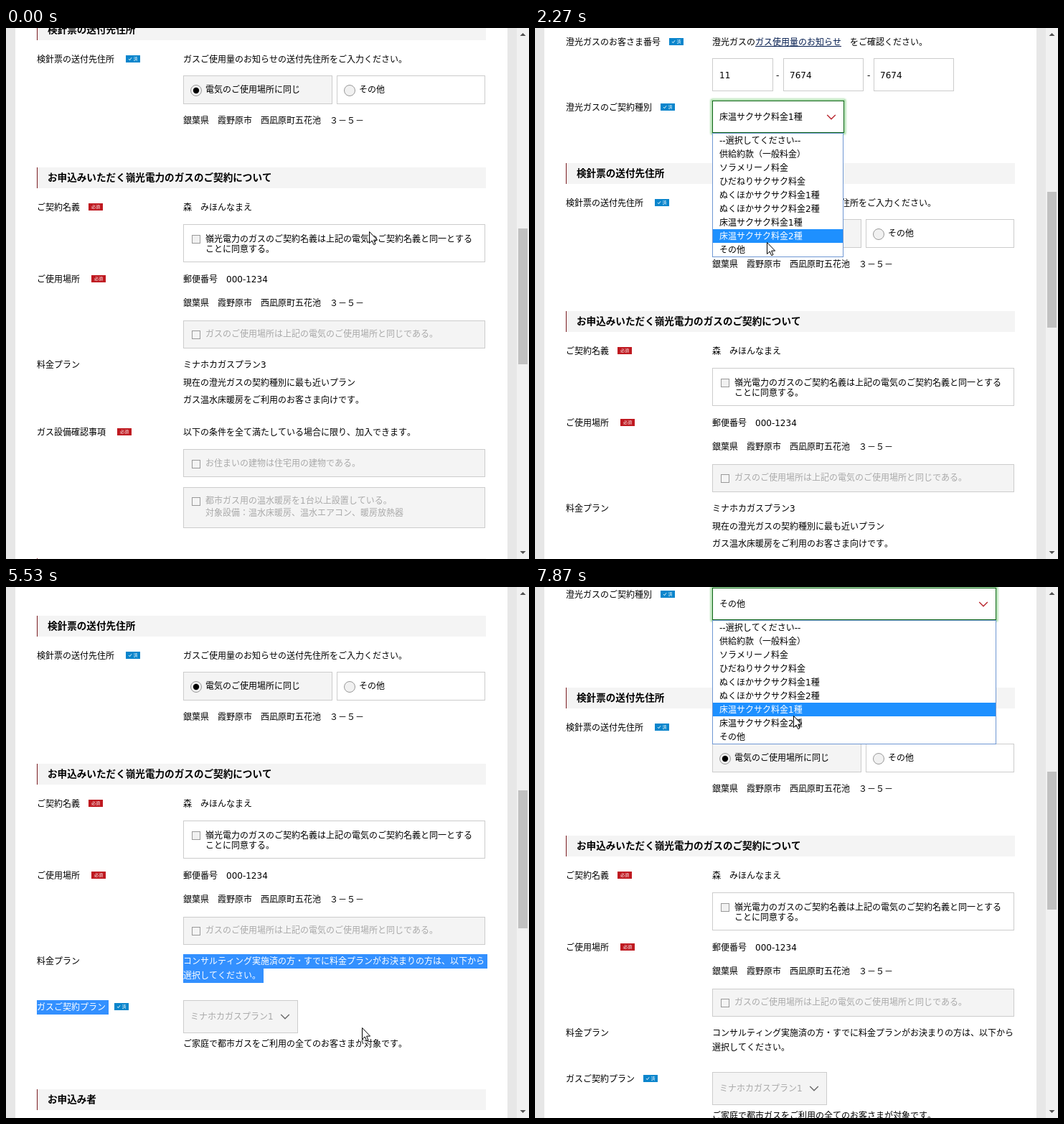
These frames come from a looping animation (729x739 px, 8 s). An HTML page:

```html
<!DOCTYPE html>
<html lang="ja">
<head>
<meta charset="utf-8">
<title>お申込みフォーム</title>
<style>
  html, body { margin: 0; width: 100%; height: 100%; overflow: hidden; background: #fff; }
  svg { display: block; }
  text {
    font: 12px "DejaVu Sans", "Noto Sans CJK JP", "Noto Sans CJK", sans-serif;
    font-kerning: none; text-spacing-trim: space-all; white-space: pre;
  }
  text.head { font-size: 13.6px; font-weight: bold; }
  text.tag { font-size: 6px; fill: #fff; }
  text.link { fill: #001a4d; }
  #glow { filter: blur(.8px); }
</style>
</head>
<body>
<svg id="stage" width="729" height="739" viewBox="0 0 729 739"></svg>
<script>
const LOOP = 8000;
const GREY = '#f4f4f4', LINE = '#ccc', FAINT = '#a9a9a9', HOT = '#1e90ff', ACCENT = '#7a1c20';
const POWER = '嶺光電力', GAS = '澄光ガス', PLAN = 'ミナホカガスプラン';
const ADDRESS = '銀葉県　霞野原市　西凪原町五花池　３－５－';
const OPTIONS = ['--選択してください--', '供給約款（一般料金）', 'ソラメリーノ料金', 'ひだねりサクサク料金',
  'ぬくほかサクサク料金1種', 'ぬくほかサクサク料金2種', '床温サクサク料金1種', '床温サクサク料金2種', 'その他'];
const ROW = 19, LIST_TOP = 147, LOWER_SHIFT = 52;

// --- drawing helpers: y of a text is the middle of its line ---
const text = (x, y, s, attrs = '') => `<text x="${x}" y="${y + 5}" ${attrs}>${s}</text>`;
const rect = (x, y, w, h, fill, attrs = '') =>
  `<rect x="${x}" y="${y}" width="${w}" height="${h}" fill="${fill}" ${attrs}/>`;
const box = (x, y, right, bottom, fill = '#fff', stroke = LINE, id = '') =>
  rect(x + .5, y + .5, right - x - 1, bottom - y - 1, fill, `stroke="${stroke}" id="${id}"`);
const link = (x, y, s) => text(x, y, s, 'class="link"') + rect(x, y + 6, s.length * 12, 1, '#001a4d');
const faint = (x, y, s) => text(x, y, s, `fill="${FAINT}"`);
const heading = (y, s) => rect(43, y, 626, 29, GREY) + rect(43, y, 1, 29, ACCENT) + text(58, y + 14, s, 'class="head"');
const required = (x, y) => rect(x, y - 5, 20, 10, '#bf1920') + text(x + 4, y - 3, '必須', 'class="tag"');
const done = (x, y) => rect(x, y - 5, 20, 10, '#0a85cc') +
  `<path d="M${x + 4} ${y}l1.5 1.7 2.5-3.4" fill="none" stroke="#fff" stroke-width=".9"/>` +
  text(x + 10.5, y - 3, '済', 'class="tag"');
const check = (y, fill) => box(259, y, 271, y + 12, fill, '#999');
const chevron = (x, y, color, id = '') =>
  `<path id="${id}" d="M-5.8 -3L0 2.8L5.8 -3" transform="translate(${x} ${y})" fill="none" stroke="${color}" stroke-width="1.3"/>`;
const radio = (x, y, on) => `<circle cx="${x}" cy="${y}" r="7.5" fill="#f1f1f1" stroke="#999"/>` +
  (on ? `<circle cx="${x}" cy="${y}" r="4.2"/>` : '');

const customer = [
  text(43, 19, `${GAS}のお客さま番号`), done(187, 19),
  text(247, 19, `${GAS}の`), link(307, 19, 'ガス使用量のお知らせ'), text(439, 19, 'をご確認ください。'),
  box(247, 42, 332, 88), box(346, 42, 458, 88), box(472, 42, 584, 88),
  text(257, 65, '11'), text(336, 65, '-'), text(355, 65, '7674'), text(463, 65, '-'), text(481, 65, '7674'),
  text(43, 110, `${GAS}のご契約種別`), done(175, 110)
];

const select = [
  rect(246, 100, 0, 47, 'none', 'id="glow" stroke="#a5dca5" stroke-width="3" rx="1"'),
  box(247, 101, 431, 146, '#fff', LINE, 'select'),
  text(257, 123, '', 'id="value"'), chevron(413, 124, '#b8232b', 'arrow')
];

const advice = [
  text(247, 155, '「その他」の方は、まずはコンサルティングの実施をお願いいたします。'),
  link(247, 175, 'コンサルティングの申し込みはこちら')
];

const common = [
  heading(188, '検針票の送付先住所'),
  text(43, 243, '検針票の送付先住所'), done(167, 243),
  text(247, 243, 'ガスご使用量のお知らせの送付先住所をご入力ください。'),
  box(247, 266, 455, 306, GREY), radio(265, 287, true), text(278, 285, '電気のご使用場所に同じ'),
  box(461, 266, 668, 306), radio(479, 287, false), text(492, 285, 'その他'),
  text(247, 328, ADDRESS),
  heading(394, `お申込みいただく${POWER}のガスのご契約について`),
  text(43, 449, 'ご契約名義'), required(115, 449), text(247, 449, '森　みほんなまえ'),
  box(247, 473, 668, 526), check(488, '#f1f1f1'),
  text(278, 493, `${POWER}のガスのご契約名義は上記の電気のご契約名義と同一とする`),
  text(278, 507, 'ことに同意する。'),
  text(43, 549, 'ご使用場所'), required(119, 549), text(247, 549, '郵便番号　000-1234'),
  text(247, 582, ADDRESS),
  box(247, 607, 668, 646, GREY), check(621, GREY), faint(278, 625, 'ガスのご使用場所は上記の電気のご使用場所と同じである。'),
  text(43, 668, '料金プラン')
];

const floorHeating = [
  text(247, 668, `${PLAN}3`),
  text(247, 693, `現在の${GAS}の契約種別に最も近いプラン`),
  text(247, 717, 'ガス温水床暖房をご利用のお客さま向けです。'),
  text(43, 762, 'ガス設備確認事項'), required(155, 762),
  text(247, 762, '以下の条件を全て満たしている場合に限り、加入できます。'),
  box(247, 786, 668, 825, GREY), check(801, GREY), faint(278, 805, 'お住まいの建物は住宅用の建物である。'),
  box(247, 839, 668, 896, GREY), check(853, GREY),
  faint(278, 857, '都市ガス用の温水暖房を1台以上設置している。'),
  faint(278, 874, '対象設備：温水床暖房、温水エアコン、暖房放熱器'),
  heading(938, '')
];

// Selectable lines of the other layout: x, middle, string.
const LINES = [
  [247, 668, 'コンサルティング実施済の方・すでに料金プランがお決まりの方は、以下から'],
  [247, 688, '選択してください。'],
  [43, 732, 'ガスご契約プラン'],
  [247, 783, 'ご家庭で都市ガスをご利用の全てのお客さまが対象です。']
];
const otherPlan = [
  ...LINES.map(l => text(...l)), done(151, 732),
  box(247, 723, 407, 769, GREY), faint(257, 745, `${PLAN}1`), chevron(389, 746, '#666'),
  heading(847, 'お申込み者'),
  '<clipPath id="marked">', ...LINES.map(() => '<rect class="mark" height="20"/>'), '</clipPath>',
  '<g clip-path="url(#marked)">', rect(0, 650, 700, 150, '#3390ff'),
  ...LINES.map(l => text(...l, 'fill="#fff"')), '</g>'
];

const list = [
  box(247, 146, 430, 319, '#fff', '#6f97d3', 'frame'),
  rect(248, 0, 0, ROW, HOT, 'id="hot"'),
  ...OPTIONS.map((s, i) => text(257, LIST_TOP + ROW * i + 9, s, 'class="option"'))
];

const group = (id, parts) => `<g id="${id}">${parts.join('')}</g>`;
document.getElementById('stage').innerHTML = [
  rect(0, 0, 729, 739, '#e7e7e7'), rect(13, 0, 686, 739, '#fff'),
  group('page', [
    ...customer, ...select, group('advice', advice),
    group('lower', [...common, group('planA', floorHeating), group('planB', otherPlan)]),
    group('list', list)
  ]),
  rect(712, 0, 17, 739, '#f1f1f1'), rect(714, 0, 13, 189, '#c1c1c1', 'id="thumb"'),
  '<path d="M716.5 11l4-4 4 4zM716.5 728l4 4 4-4z" fill="#505050"/>',
  '<path id="cursor" d="M.5 .5v16l3.7-3.5 2.5 5.6 2.3-1-2.4-5.5h5z" fill="#fff" stroke="#000"/>'
].join('');

const $ = id => document.getElementById(id);
const set = (el, attrs) => { for (const k in attrs) el.setAttribute(k, attrs[k]); };
const show = (id, on) => set($(id), { display: on ? 'inline' : 'none' });
const marks = [...document.querySelectorAll('.mark')];
const options = [...document.querySelectorAll('.option')];

// --- motion ---
const clamp = (v, lo, hi) => Math.max(lo, Math.min(hi, v));
const ease = (t, start, span) => { const u = clamp((t - start) / span, 0, 1); return u * u * (3 - 2 * u); };

const PATH = [ // time, x, y of the pointer
  [0, 507, 283], [70, 507, 291], [270, 507, 291], [930, 517, 478], [1000, 517, 478], [1070, 516, 474],
  [1200, 515, 468], [1730, 392, 135], [1870, 391, 133], [2270, 324, 298], [2400, 317, 303], [2530, 317, 303],
  [2600, 316, 297], [2730, 316, 297], [3000, 331, 333], [3400, 331, 333], [3470, 342, 328], [3870, 342, 328],
  [4270, 301, 500], [4530, 247, 532], [4730, 243, 563], [4800, 243, 563], [5000, 245, 514], [5670, 564, 639],
  [5730, 579, 650], [5800, 579, 650], [6130, 607, 627], [6200, 607, 627], [6330, 608, 596], [6670, 608, 596],
  [7200, 480, 40], [7400, 450, 24], [7530, 440, 24], [7870, 361, 179], [LOOP, 361, 179]
];

function pointer(t) {
  const i = PATH.findIndex(p => p[0] > t);
  const [a, b] = [PATH[i - 1], PATH[i]];
  const u = (t - a[0]) / (b[0] - a[0]);
  return [1, 2].map(k => Math.round(a[k] + (b[k] - a[k]) * u));
}

const scrollAt = t => Math.round(200 - 100 * ease(t, 270, 270) - 100 * ease(t, 1000, 225)
  + 200 * ease(t, 3600, 450) - 100 * ease(t, 6400, 310));

function drawSelect(right, focused, value) {
  set($('glow'), { width: right - 245, display: focused ? 'inline' : 'none' });
  set($('select'), { width: right - 248, stroke: focused ? '#0b6413' : LINE });
  set($('arrow'), { transform: `translate(${right - 18} 124)` });
  $('value').textContent = value;
}

function drawList(right, y) {
  const over = Math.floor((y - LIST_TOP - 1) / ROW);
  const hot = over >= 0 && over < OPTIONS.length ? over : right > 500 ? 8 : 6;
  set($('frame'), { width: right - 248 });
  set($('hot'), { y: LIST_TOP + ROW * hot, width: right - 249 });
  options.forEach((o, i) => set(o, { fill: i === hot ? '#fff' : '#000' }));
}

function drawMarks(active, x, y) {
  LINES.forEach(([left, mid, s], i) => {
    const top = mid - 9, full = s.length * 12 + 4;
    const reach = !active || y < top ? 0 : y < top + 20 && left > 43 ? clamp(x - left, 0, full - 4) : full;
    set(marks[i], { x: left, y: top, width: reach });
  });
}

function draw(now) {
  // the picture advances at 15 steps a second
  const step = Math.floor(((now % LOOP) + 4) * .015) % 120;
  const t = Math.round(step * 100 / 15) * 10;
  const other = t >= 2600, scroll = scrollAt(t), [x, y] = pointer(t);
  const focused = t >= 1870 && t < 5000 || t >= 7470;
  const open = t >= 1930 && t < 2600 || t >= 7530;
  const shift = other ? LOWER_SHIFT : 0;

  set($('page'), { transform: `translate(0 ${-scroll})` });
  set($('lower'), { transform: `translate(0 ${shift})` });
  show('advice', other);
  show('planA', !other);
  show('planB', other);
  show('list', open);
  drawSelect(other ? 643 : 431, focused, OPTIONS[other ? 8 : 6]);
  drawList(other ? 643 : 430, y + scroll);
  drawMarks(t >= 5000 && t < 5870, x, y + scroll - shift);
  set($('thumb'), {
    y: Math.floor(other ? 231.2 + scroll * .26 : 228.5 + scroll * .255),
    height: other ? 192 : 189
  });
  set($('cursor'), { transform: `translate(${x - 1} ${y})` });
}

function tick() {
  draw(performance.now());
  requestAnimationFrame(tick);
}
tick();
</script>
</body>
</html>
```
